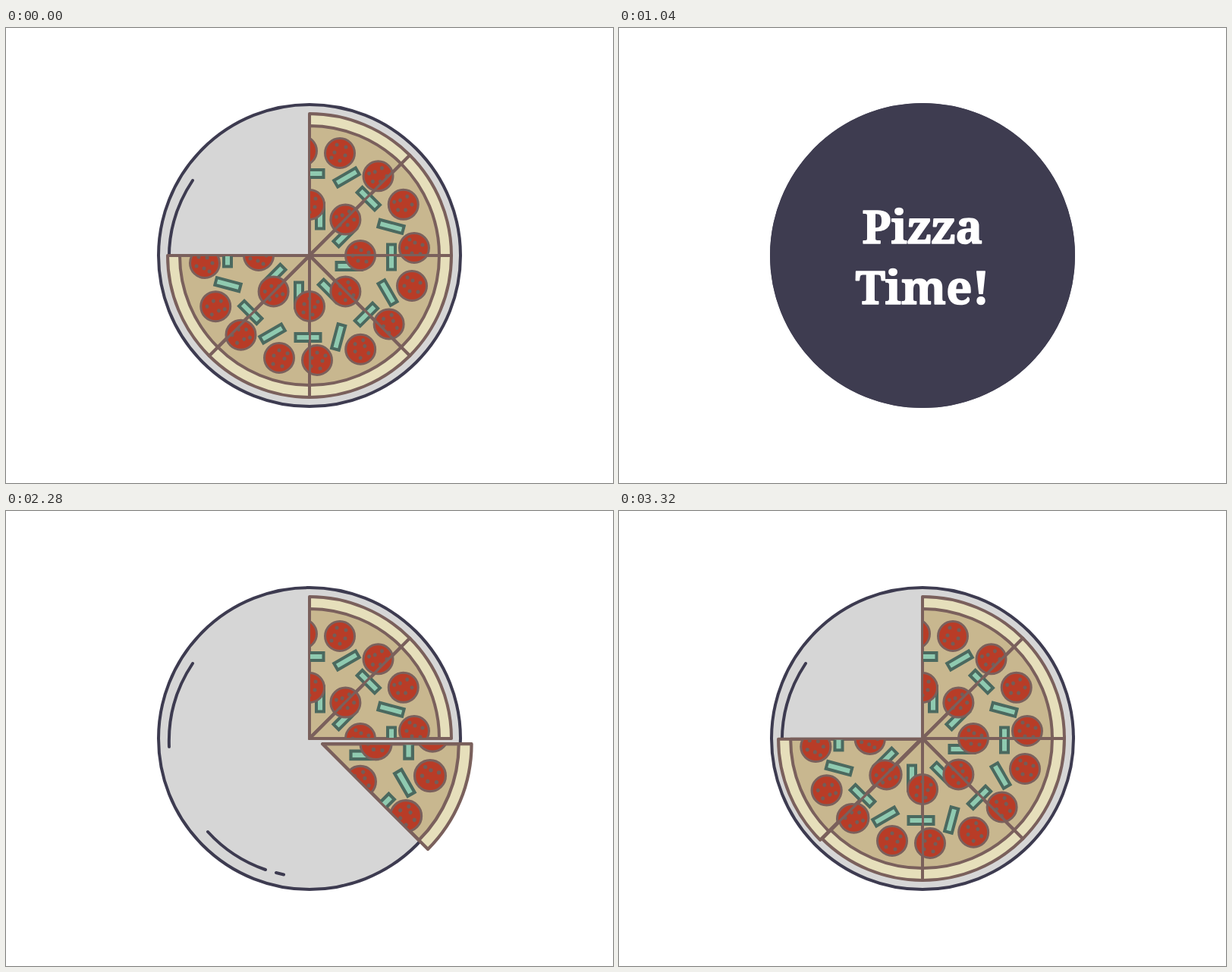
Recreate the animation shown at these times as an HTML page. Size 800 by 600 pixels, loop 3.36 s.

```html
<!DOCTYPE html>
<html lang="en">
<head>
<meta charset="utf-8">
<title>Pizza Time</title>
<style>
  html, body { margin: 0; width: 100%; height: 100%; overflow: hidden; background: #fff; }
  svg { display: block; width: 100vw; height: 100vh; }
  .tray { fill: #d6d6d6; stroke: #3d3b50; stroke-width: 4; }
  .shine { fill: none; stroke: #3d3b50; stroke-width: 4; stroke-linecap: round; }
  .crust { fill: #e6dfbb; }
  .cheese { fill: #c8b78f; }
  .edge { fill: none; stroke: #7a605c; stroke-width: 4; stroke-linejoin: round; }
  .meat { fill: #b83c27; stroke: #7a605c; stroke-width: 3; }
  .speck { fill: #735d58; }
  .pepper { fill: #8fcab0; stroke: #4b695f; stroke-width: 4; }
  .sign circle { fill: #3e3c50; }
  .sign text {
    font: 800 60px "Noto Serif", "DejaVu Serif", serif; text-anchor: middle;
    fill: #fff; stroke: #fff; stroke-width: 1.6; stroke-linejoin: round;
  }
</style>
</head>
<body>
<svg viewBox="0 0 800 600">
  <defs>
    <clipPath id="wedge"><path id="wedgePath"/></clipPath>
    <g id="meat"></g>
    <rect id="pepper" class="pepper" x="-16.5" y="-5" width="33" height="10"/>
    <g id="slice"></g>
  </defs>
  <g transform="translate(400 300)">
    <circle class="tray" r="199"/>
    <path class="shine" d="M-154-99A185 185 0 0 0-185 11M119-142A185 185 0 0 1 185-2
      M-134 123A183 183 0 0 0-58 173M-44 177L-34 179.5"/>
    <g id="pizza"></g>
    <g id="sign" class="sign">
      <circle r="201"/>
      <text y="-16">Pizza</text>
      <text y="64">Time!</text>
    </g>
  </g>
</svg>
<script>
const LOOP = 3360, STEP = 40, START = 1400;
const SLICES = 8, GAP = 320, SIGN_AT = 2600;
const byId = id => document.getElementById(id);

// Wedge from straight up to 45 degrees clockwise, tip at (x, y)
const wedge = (r, x = 0, y = 0) => {
  const c = r * Math.SQRT1_2;
  return `M${x} ${y}L${x} ${y - r}A${r} ${r} 0 0 1 ${x + c} ${y - c}Z`;
};
const use = (id, x, y, turn = 0) =>
  `<use href="#${id}" transform="translate(${x} ${y}) rotate(${turn})"/>`;

const specks = [[-4, -11], [8, -8], [-7, -1], [7, 3], [-11, 6], [0, 10]];
byId('meat').innerHTML = '<circle class="meat" r="19.5"/>' +
  specks.map(([x, y]) => `<circle class="speck" cx="${x}" cy="${y}" r="2.5"/>`).join('');

// Toppings on a cut are shared by both neighbouring slices
const onCutPepper = use('pepper', 2, -108);
const onCutMeat = use('meat', -10, -138) + use('meat', 0, -67);
const turned = s => `<g transform="rotate(45)">${s}</g>`;

byId('wedgePath').setAttribute('d', wedge(187, 1, -2.4));
byId('slice').innerHTML = `
  <path class="crust" d="${wedge(187)}"/>
  <path class="cheese" d="${wedge(171)}"/>
  <path class="edge" d="${wedge(171)}"/>
  <path class="edge" d="${wedge(187)}"/>
  <g clip-path="url(#wedge)">
    ${use('pepper', 14, -52, 90)}${use('pepper', 49, -103, -30)}
    ${onCutPepper}${turned(onCutPepper)}
    ${onCutMeat}${turned(onCutMeat)}${use('meat', 40, -135)}
  </g>`;

byId('pizza').innerHTML = Array.from({ length: SLICES }, (_, i) =>
  `<g transform="rotate(${i * 45})"><use href="#slice"/></g>`).join('');
const slices = [...byId('pizza').querySelectorAll('use')];
const sign = byId('sign');

const clamp = v => Math.min(1, Math.max(0, v));
const backOut = p => 1 + 2.6 * (p - 1) ** 3 + 1.6 * (p - 1) ** 2;
const lean = Math.PI / 8;

function draw(time) {
  const t = Math.floor((time + 0.5) / STEP) * STEP;
  const e = (t - START + LOOP) % LOOP;

  slices.forEach((slice, i) => {
    const u = e - 40 - GAP * i;
    const far = (1 - clamp((u - 80) / 240)) ** 2;
    const x = 74.5 * far * Math.sin(lean), y = -74.5 * far * Math.cos(lean);
    slice.setAttribute('transform', `translate(${x} ${y}) scale(${1 + 0.2 * far})`);
    slice.setAttribute('opacity', clamp(u / 80));
  });

  const p = clamp((e - SIGN_AT) / 400);
  sign.setAttribute('visibility', p > 0 ? 'visible' : 'hidden');
  sign.setAttribute('transform', `scale(${p > 0 ? backOut(p) : 0})`);
}

const begin = performance.now();
function tick() {
  draw((performance.now() - begin) % LOOP);
  requestAnimationFrame(tick);
}
tick();
</script>
</body>
</html>
```
